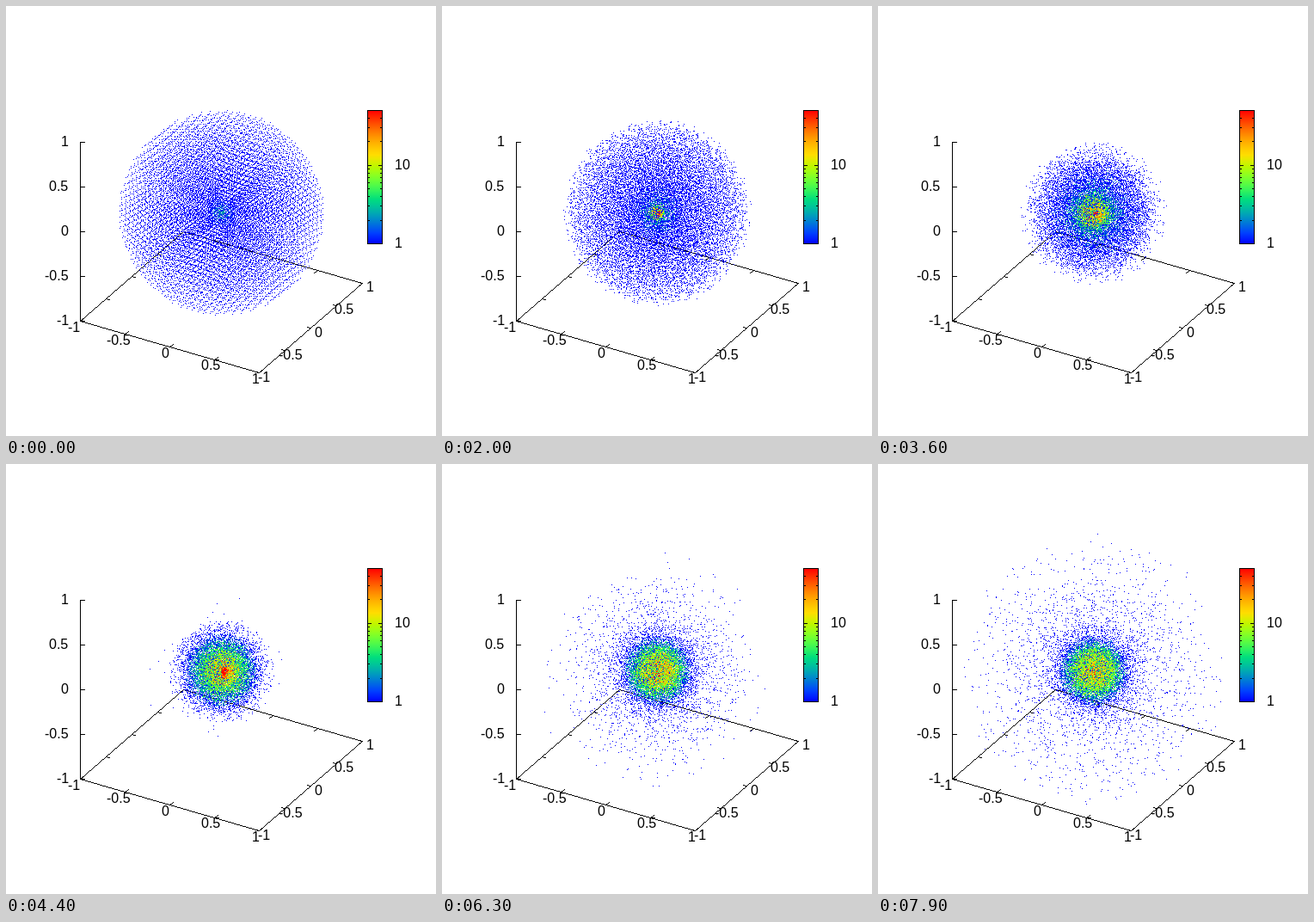
Recreate the animation shown at these times as an HTML page with a canvas. Size 500 by 500 pixels, loop 8000 ms.

```html
<!DOCTYPE html>
<html lang="en">
<head>
<meta charset="utf-8">
<title>Collapsing sphere</title>
<style>
  html, body { margin: 0; width: 100%; height: 100%; overflow: hidden; background: #fff; }
  svg, canvas { position: absolute; left: 0; top: 0; width: 500px; height: 500px; }
  text { font: 16px "Liberation Sans", Arial, sans-serif; fill: #000; }
</style>
</head>
<body>
<canvas id="dots" width="500" height="500"></canvas>
<svg id="labels" viewBox="0 0 500 500"></svg>
<script>
const SIZE = 500, LOOP = 8000, STEP = 100, TIME_PER_STEP = 0.021;
const CELLS = 16;        // lattice cells per radius
const SETTLE = 0.33;     // settled radius relative to the starting radius
const BIN = 0.05, BINS = 40;
const RHO_MAX = 50;

// Seeded random numbers
let seed = 20117;
function rand() {
  seed = (seed + 0x6D2B79F5) | 0;
  let t = Math.imul(seed ^ (seed >>> 15), 1 | seed);
  t = (t + Math.imul(t ^ (t >>> 7), 61 | t)) ^ t;
  return ((t ^ (t >>> 14)) >>> 0) / 4294967296;
}
const gauss = () => rand() + rand() + rand() + rand() - 2;
const clamp = v => Math.min(1, Math.max(0, v));

// View turned by 60 and 30 degrees
const project = (x, y, z) => [
  250 + 104 * x + 60 * y,
  240 + 30 * x - 52 * y - 104 * z
];

// Blue, green, yellow, red
const pack = (r, g, b) => ((255 << 24) | (b << 16) | (g << 8) | r) >>> 0;
function palette(f) {
  const rgb = [3 * f - 1, Math.sin(Math.PI * f), 1.16 - 2 * f];
  return pack(...rgb.map(c => Math.round(255 * clamp(c))));
}
const colors = Array.from({ length: 128 }, (_, i) => palette(i / 127));
const BLACK = pack(0, 0, 0);

const ctx = document.getElementById("dots").getContext("2d");
const image = ctx.createImageData(SIZE, SIZE);
const pixels = new Uint32Array(image.data.buffer);
const backdrop = new Uint32Array(SIZE * SIZE).fill(pack(255, 255, 255));

function line(x0, y0, x1, y1, color = BLACK) {
  const n = Math.max(Math.abs(x1 - x0), Math.abs(y1 - y0));
  for (let i = 0; i <= n; i++) {
    const x = Math.round(x0 + (x1 - x0) * i / n);
    const y = Math.round(y0 + (y1 - y0) * i / n);
    backdrop[y * SIZE + x] = color;
  }
}

function drawPlot() {
  const tick = (x, y, dx, dy) => line(x, y, x + dx, y + dy);
  let out = "";
  const label = (s, x, y) => { out += `<text x="${x}" y="${y}">${s}</text>`; };

  line(86, 158, 86, 366);
  line(86, 366, 294, 426);
  line(294, 426, 414, 322);
  line(414, 322, 206, 262);
  line(206, 262, 86, 366);

  const xLeft = [72, 117, 181, 227, 286], xBase = [379, 394, 409, 423, 439];
  const yLeft = [293, 317, 359, 382, 419];
  const zLeft = [59, 45, 64, 50, 64];
  [-1, -0.5, 0, 0.5, 1].forEach((v, i) => {
    tick(...project(v, -1, -1), 4, -3);
    tick(...project(v, 1, -1), -4, 3);
    tick(...project(1, v, -1), -4, -1);
    tick(...project(-1, v, -1), 4, 1);
    tick(86, 262 - 104 * v, 5, 0);
    label(v, xLeft[i], xBase[i]);
    label(v, yLeft[i], 437 - Math.round(26.2 * i));
    label(v, zLeft[i], 371 - 52 * i);
  });

  const left = 420, right = 437, top = 121, bottom = 276, h = bottom - top;
  for (let y = top; y <= bottom; y++) line(left, y, right, y, palette((bottom - y) / h));
  line(left, top, right, top);
  line(left, bottom, right, bottom);
  line(left, top, left, bottom);
  line(right, top, right, bottom);
  for (const v of [2, 3, 4, 5, 6, 7, 8, 9, 10, 20, 30, 40]) {
    const y = Math.round(bottom - h * Math.log(v) / Math.log(RHO_MAX));
    const len = v === 10 ? 4 : 2;
    tick(left, y, len, 0);
    tick(right, y, -len, 0);
  }
  label("10", 452, 190);
  label("1", 452, 281);
  document.getElementById("labels").innerHTML = out;
}

// Free fall from rest, as a share of the starting radius
const FALL_END = Math.PI / 2 / Math.SQRT2, FALL_N = 1000;
const fallTable = Float64Array.from({ length: FALL_N + 1 }, (_, i) => {
  const goal = i / FALL_N * Math.PI / 2;
  let lo = 0, hi = Math.PI / 2;
  for (let n = 0; n < 30; n++) {
    const m = (lo + hi) / 2;
    if (m + Math.sin(m) * Math.cos(m) < goal) lo = m; else hi = m;
  }
  return Math.cos(lo) ** 2;
});
const fall = t => t >= FALL_END ? 0 : fallTable[Math.floor(t / FALL_END * FALL_N)];

// A cubic lattice, stretched so that the density goes as 1 / r
function makeParticles() {
  const list = [];
  for (let i = -CELLS; i <= CELLS; i++)
    for (let j = -CELLS; j <= CELLS; j++)
      for (let k = -CELLS; k <= CELLS; k++) {
        const q = Math.hypot(i, j, k);
        if (q > CELLS || q === 0) continue;
        const r0 = (q / CELLS) ** 1.5;
        const axis = Math.max(Math.abs(i), Math.abs(j), Math.abs(k)) / q;
        const eject = axis > 0.965 && r0 > 0.3 ? 0.4 : 0.4 * clamp((r0 - 0.35) / 0.4);
        const u = rand();
        list.push({
          dir: [i / q, j / q, k / q],
          drift: [gauss(), gauss(), gauss()],
          r0,
          settled: SETTLE * r0 * Math.exp(0.4 * gauss()),
          reach: rand() < eject ? 0.2 + 1.25 * u * u : 0,
          lag: rand(),
          noise: gauss()
        });
      }
  return list;
}

const parts = makeParticles();
const radii = new Float64Array(parts.length);

function radiusAt(p, t) {
  const root = Math.sqrt(p.r0);
  // pressure holds back the rim while the rest runs ahead
  const rim = 1 + t * t * (0.16 * p.r0 ** 8 - 0.6 * p.lag * p.r0 ** 2);
  const inward = p.r0 * fall(t / root) * rim;
  if (!p.reach) return Math.max(inward, Math.min(p.settled, p.r0));
  const since = Math.max(0, t - 1.1 * root);
  return Math.max(inward, p.reach * (1 - Math.exp(-since / 0.3)));
}

// Log density at the middle of each radial bin
function densityProfile() {
  const count = new Float64Array(BINS);
  for (const r of radii) count[Math.min(BINS - 1, Math.floor(r / BIN))]++;
  return count.map((n, i) => {
    const volume = 4 / 3 * Math.PI * BIN ** 3 * ((i + 1) ** 3 - i ** 3);
    return Math.log(Math.max(n, 0.1) / parts.length / volume);
  });
}

function drawDots(step) {
  const t = step * TIME_PER_STEP;
  parts.forEach((p, n) => { radii[n] = radiusAt(p, t); });
  const profile = densityProfile();
  const wander = 0.2 * t * t, mottle = 0.8 * Math.min(1, 2 * t);
  pixels.set(backdrop);
  parts.forEach((p, n) => {
    const r = radii[n];
    const v = p.dir.map((c, i) => c + wander * p.drift[i]);
    const s = r / Math.hypot(...v);
    const [x, y] = project(v[0] * s, v[1] * s, v[2] * s);
    const b = Math.min(BINS - 1.001, Math.max(0, r / BIN - 0.5)), i = Math.floor(b);
    const rho = profile[i] + (profile[i + 1] - profile[i]) * (b - i) + mottle * p.noise;
    const f = clamp(rho / Math.log(RHO_MAX));
    pixels[Math.round(y) * SIZE + Math.round(x)] = colors[Math.round(f * 127)];
  });
  ctx.putImageData(image, 0, 0);
}

let shown = -1;
const start = performance.now();
function tickFrame() {
  const step = Math.floor(((performance.now() - start) % LOOP) / STEP);
  if (step !== shown) drawDots(shown = step);
  requestAnimationFrame(tickFrame);
}

drawPlot();
tickFrame();
</script>
</body>
</html>
```
